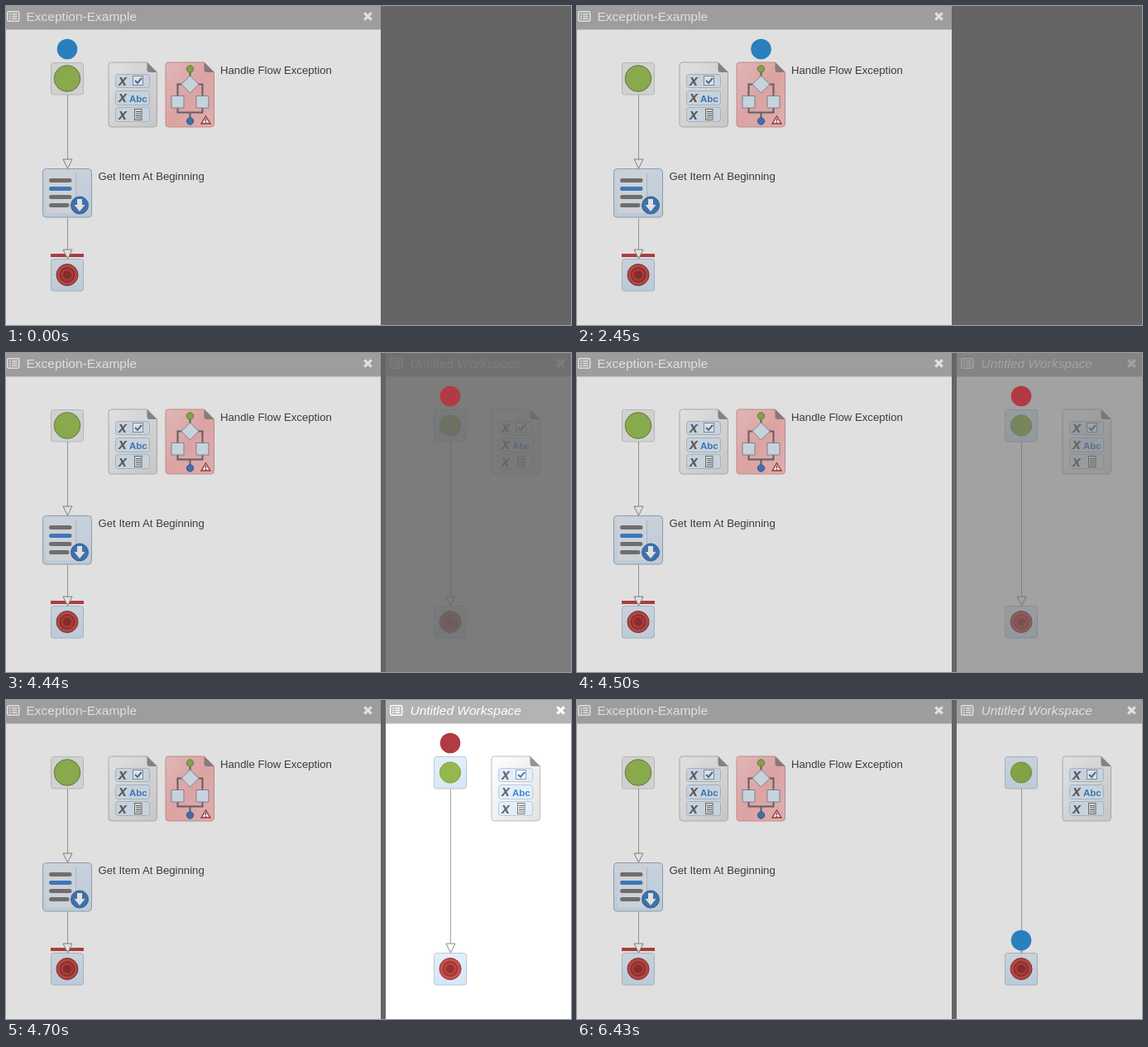
Animation, 683 px wide and 385 px high, one loop 8 s. Source, as an HTML page:

```html
<!DOCTYPE html>
<html lang="en">
<head>
<meta charset="utf-8">
<title>Flow debugger</title>
<style>
html, body { margin: 0; height: 100%; overflow: hidden; background: #656565; }
svg { display: block; width: 100vw; height: 100vh; }
text { font-family: "Liberation Sans", Arial, sans-serif; }
.title { font-size: 15.5px; fill: #fff; }
.label { font-size: 13.2px; fill: #444; }
.x { font: italic bold 18px "Liberation Serif", serif; fill: #666; }
.line { fill: none; stroke: #a6a6a6; }
.tip { fill: #fff; stroke: #8c8c8c; }
.wire { fill: none; stroke: #6c6c70; stroke-width: 2; }
.cell { fill: #e2effa; stroke: #b5cbe0; }
</style>
</head>
<body>
<svg viewBox="0 0 683 385">
  <defs>
    <linearGradient id="paper" x2="1" y2="1">
      <stop stop-color="#fff"/><stop offset="1" stop-color="#e2e2e2"/>
    </linearGradient>
    <linearGradient id="pink" x2="1" y2="1">
      <stop stop-color="#ffd0d0"/><stop offset=".5" stop-color="#fbb9b9"/><stop offset="1" stop-color="#fcc6c6"/>
    </linearGradient>
    <linearGradient id="sky" x2="0" y2="1">
      <stop stop-color="#e4effa"/><stop offset="1" stop-color="#d6e6f5"/>
    </linearGradient>
    <path id="page" d="M4 .5H47L59 12.5V75Q59 78.5 55 78.5H4Q.5 78.5 .5 75V4Q.5 .5 4 .5Z"/>
    <path id="fold" d="M47 .5L59 12.5H50Q47 12.5 47 9Z"/>
    <rect id="box" x="54.5" width="39" height="38.5" rx="3"/>
    <path id="tip" d="M69 0H80L74.5 11Z" class="tip"/>
    <path id="close" d="M-4.2-4.2L4.2 4.2M4.2-4.2L-4.2 4.2" stroke="#fff" stroke-width="3.2"/>
    <g id="menu" stroke="#fff" fill="none">
      <rect x="1.7" y="6.7" width="14" height="11.6" rx="1.5" stroke-width="1.5"/>
      <path d="M4 9.7h2m1.2 0h6.3M4 12.5h2m1.2 0h6.3M4 15.3h2m1.2 0h6.3" stroke-width="1.4"/>
    </g>
    <g id="vars">
      <g transform="translate(123.5 67.5)">
        <use href="#page" fill="url(#paper)" stroke="#bdbdbd"/>
        <use href="#fold" fill="#949494"/>
      </g>
      <g class="cell">
        <rect x="132.5" y="82.5" width="41" height="16" rx="3"/>
        <rect x="132.5" y="102.5" width="41" height="17" rx="3"/>
        <rect x="132.5" y="122.5" width="41" height="17" rx="3"/>
      </g>
      <g class="x">
        <text x="136" y="96">x</text><text x="136" y="116">x</text><text x="136" y="137">x</text>
      </g>
      <rect x="153.5" y="84.5" width="12" height="11" fill="#fff" stroke="#8f9aa5"/>
      <path d="M156 90l3 3 5-6" fill="none" stroke="#3f7fc6" stroke-width="2"/>
      <text x="149" y="115.5" font-size="11.5" font-weight="bold" fill="#4585c8">Abc</text>
      <rect x="155.5" y="124.5" width="8.5" height="13" fill="#f4f4f4" stroke="#777"/>
      <path d="M157 127.5h6m-6 2.5h6m-6 2.5h6m-6 2.5h6" stroke="#666"/>
    </g>
    <g id="end">
      <use href="#box" y="305.5" fill="url(#sky)" stroke="#b9c9d8"/>
      <circle cx="74" cy="324.5" r="13" fill="#c9504f" stroke="#8f3433"/>
      <circle cx="74" cy="324.5" r="8.5" fill="#bd4543" stroke="#953230" stroke-width="1.5"/>
      <circle cx="74" cy="324.5" r="5" fill="#983231"/>
    </g>
  </defs>

  <g id="main">
    <path d="M0 0H453V385H0Z" fill="#fff"/>
    <path d="M0 0H453V28.5H0Z" fill="#b3b3b3"/>
    <use href="#menu"/>
    <text class="title" x="24.5" y="18">Exception-Example</text>
    <use href="#close" x="437.5" y="12.5"/>

    <use href="#box" y="68.5" fill="#eeeeec" stroke="#cfcfcf"/>
    <circle cx="74" cy="87.5" r="15.8" fill="#9cc058" stroke="#73845a"/>
    <path class="line" d="M74.5 107V185M74.5 256V294"/>
    <use href="#tip" y="185"/>

    <rect x="44.5" y="196.5" width="59" height="58.5" rx="4" fill="url(#sky)" stroke="#9eb1c3"/>
    <path d="M49 202H84V250H49Z" fill="#e9eef3"/>
    <path d="M84.5 202V230" stroke="#c0cfdd"/>
    <g stroke-width="5" stroke-linecap="round" stroke="#7d7d7d">
      <path d="M54.5 210.5H77M54.5 230.5H77M54.5 240.5H74"/>
      <path d="M54.5 220.5H77" stroke="#4787d3"/>
    </g>
    <circle cx="89" cy="240.5" r="10.5" fill="#4780c4" stroke="#3d6ca5"/>
    <path d="M86 233H92V240H95.5L89 248L82.5 240H86Z" fill="#fff"/>
    <text class="label" x="111.5" y="210">Get Item At Beginning</text>

    <path d="M54 299H94V303H54Z" fill="#c24742"/>
    <use href="#tip" y="294"/>
    <use href="#end"/>
    <use href="#vars"/>

    <g transform="translate(192.5 67.5)">
      <use href="#page" fill="url(#pink)" stroke="#d69c9c"/>
      <use href="#fold" fill="#9b8a8a"/>
    </g>
    <path class="wire" d="M222.5 79V85M213 94.5H207.5V108M232 94.5H237.5V108M207.5 123V128.5H237.5V123M222.5 128.5V136"/>
    <g fill="#e4eff9" stroke="#8296a8">
      <path d="M222.5 84L233 94.5L222.5 105L212 94.5Z"/>
      <path d="M200 108.5H215V123H200ZM230 108.5H245V123H230Z"/>
    </g>
    <circle cx="222.5" cy="76" r="4.2" fill="#92b94c" stroke="#6f8d45"/>
    <circle cx="222.5" cy="139" r="4.2" fill="#477fc5" stroke="#3a669c"/>
    <path d="M241.5 133L247 142H236Z" fill="#fff" stroke="#b13d3d" stroke-width="1.4"/>
    <path d="M241.5 136v3m0 1v1.3" stroke="#8f3030" stroke-width="1.2"/>
    <text class="label" x="259" y="82">Handle Flow Exception</text>
    <path d="M0 0H453V385H0Z" opacity=".12"/>
  </g>

  <g id="side" transform="translate(463)">
    <path d="M-4 0H220V385H-4Z" fill="#fff"/>
    <path d="M-4 0H220V28.5H-4Z" fill="#b3b3b3"/>
    <use href="#menu"/>
    <text class="title" x="25.5" y="18" font-style="italic">Untitled Workspace</text>
    <use href="#close" x="207.5" y="12.5"/>
    <use href="#box" y="68.5" fill="url(#sky)" stroke="#b9c9d8"/>
    <circle cx="74" cy="87.5" r="12.6" fill="#95b84e" stroke="#7fa041"/>
    <path class="line" d="M74.5 107V294"/>
    <use href="#tip" y="294"/>
    <use href="#end"/>
    <use href="#vars"/>
    <path id="shade" d="M-4 0H220V385H-4Z" opacity=".12"/>
  </g>

  <circle id="token" r="12.3"/>
</svg>
<script>
const LOOP = 8000, OPEN = 4440, FAIL_END = 6170, SHADE = 5970;
// start time, x, y of each token stop
const stops = [
  [0, 74, 52], [500, 42, 87.5], [780, 74, 180.5], [2170, 32, 225.5],
  [2450, 222.5, 52], [4160, 180.5, 107], [OPEN, 537, 52],
  [FAIL_END, 505, 87.5], [6430, 537, 290]
];
const [side, shade, token] = ["side", "shade", "token"].map(id => document.getElementById(id));

function draw(t) {
  const [, x, y] = stops.findLast(s => s[0] <= t);
  const failed = t >= OPEN && t < FAIL_END;
  const step = Math.floor((t - OPEN) / 60);
  token.setAttribute("cx", x);
  token.setAttribute("cy", y);
  token.setAttribute("fill", failed ? "#b23a42" : "#2a7fbd");
  side.setAttribute("opacity", t < OPEN ? 0 : Math.min(1, 0.15 + 0.25 * step));
  shade.setAttribute("opacity", t < SHADE ? 0 : 0.12);
}

const began = performance.now();
function tick() {
  draw((performance.now() - began) % LOOP);
  requestAnimationFrame(tick);
}
tick();
</script>
</body>
</html>
```
